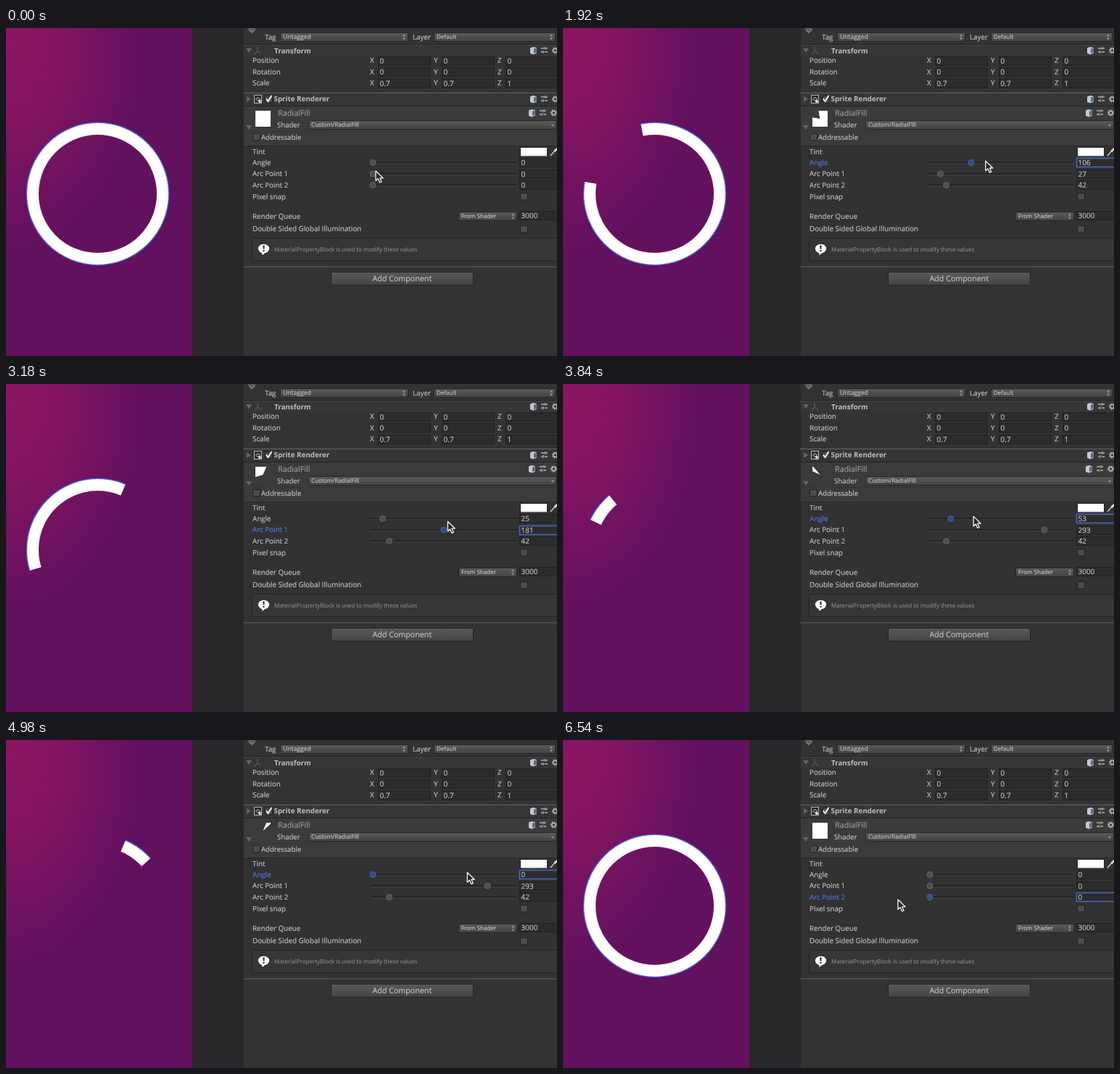
Write an HTML page that moves like this. It is 760 px wide and 452 px high and loops after 6.6 s.

```html
<!DOCTYPE html>
<html lang="en">
<head>
<meta charset="utf-8">
<title>Radial fill inspector</title>
<style>
  html, body { margin: 0; width: 100%; height: 100%; overflow: hidden; background: #282628; }
  svg { display: block; width: 760px; height: 452px; }
  text {
    font-family: "Open Sans", "Noto Sans", sans-serif; color: #bebebe;
    fill: currentColor; stroke: currentColor; stroke-width: .2px;
    text-rendering: geometricPrecision; white-space: pre;
  }
  .dim { color: #989898; }
  .note { color: #9a9a9a; stroke: none; }
  .bold { font-weight: 700; stroke: none; }
  .on { color: #5272da; }
</style>
</head>
<body>
<svg id="stage" viewBox="0 0 760 452" xmlns="http://www.w3.org/2000/svg">
  <defs>
    <radialGradient id="glow" gradientUnits="userSpaceOnUse" cx="0" cy="0" r="1" gradientTransform="translate(8 25) scale(180 285)">
      <stop offset="0" stop-color="#8d1563"/>
      <stop offset=".35" stop-color="#841462"/>
      <stop offset=".7" stop-color="#70125f"/>
      <stop offset="1" stop-color="#62115f"/>
    </radialGradient>
    <linearGradient id="raised" x2="0" y2="1">
      <stop offset="0" stop-color="#5a5a5a"/>
      <stop offset="1" stop-color="#434343"/>
    </linearGradient>
    <clipPath id="ringClip"><path/></clipPath>
    <clipPath id="thumbClip"><path/></clipPath>
  </defs>
</svg>
<script>
const NS = 'http://www.w3.org/2000/svg';
const stage = document.getElementById('stage');

function add(tag, attrs, parent = stage) {
  const el = document.createElementNS(NS, tag);
  for (const k in attrs) el.setAttribute(k, attrs[k]);
  return parent.appendChild(el);
}
const rect = (x, y, width, height, fill, more) => add('rect', { x, y, width, height, fill, ...more });
const path = (d, more) => add('path', { d, fill: 'none', ...more });
const hline = (y, stroke) => path(`M327 ${y}H760`, { stroke });

function label(x, y, str, size = 9.8, style = '') {
  const el = add('text', { x, y, 'font-size': size, class: style });
  el.textContent = str;
  return el;
}
function popup(x, y, w, str, size = 8) {
  rect(x + .5, y + .5, w - 1, 12, 'url(#raised)', { rx: 2, stroke: '#262626' });
  label(x + 4, y + 9.2, str, size);
}
const updown = (x, y) =>
  path(`M${x - 2} ${y - 1}l2-3 2 3zM${x - 2} ${y + 1}l2 3 2-3z`, { fill: '#999' });

function field(x, y, w, str) {
  const box = rect(x + .5, y + .5, w, 12, '#2c2c2c', { stroke: '#222' });
  return { box, text: label(x + 2.5, y + 9.8, str, 10) };
}
const checkbox = (x, y) =>
  rect(x + .5, y + .5, 10, 9.5, '#4c4c4c', { rx: 2, stroke: '#1e1e1e' });
const foldDown = (x, y) => path(`M${x - 4} ${y - 3}h8l-4 6z`, { fill: '#656565' });

function headerIcons(x, y) {
  path(`M${x - 4} ${y - 3.5}l4-1.5 4.5 1v8l-4.5 1.5-4-1.5z`, { fill: '#c4c8cc' });
  path(`M${x + 1} ${y - 2.5}l3-.5v6l-3 1z`, { fill: '#4c6d94' });
  path(`M${x + 11} ${y - 3}h5m2 0h2M${x + 11} ${y + 2}h2m3 0h4M${x + 17} ${y - 5}v4M${x + 14} ${y}v4`,
    { stroke: '#b2b2b2', 'stroke-width': 1.3 });
  const gear = (r, width, dash) => add('circle', { cx: x + 30.5, cy: y, r, fill: 'none',
    stroke: '#b2b2b2', 'stroke-width': width, 'stroke-dasharray': dash });
  gear(2.6, 1.6, 'none');
  gear(4, 1.2, '1.6 1.54');
}

// scene view
const CX = 126.5, CY = 228.5;
rect(0, 0, 257, 452, 'url(#glow)');
rect(257, 0, 70, 452, '#282628');
const ring = add('g', { 'clip-path': 'url(#ringClip)', fill: 'none' });
const circle = (r, stroke, width) => add('circle', { cx: CX, cy: CY, r, stroke, 'stroke-width': width }, ring);
circle(97.9, '#4573e8', 1.6);
circle(81.4, '#a8365e', .8);
circle(89.5, '#fff', 15.8);

// inspector
rect(327, 0, 433, 452, '#333');
rect(327, 23, 433, 16, '#363636');
rect(327, 90, 433, 16, '#363636');
rect(327, 107, 433, 55, '#3b3b3b');
rect(327, 162, 433, 167, '#323232');
path('M327.5 0V452', { stroke: '#2a2a2a' });
hline(22.5, '#1f1f1f');
hline(23.5, '#464646');
hline(89.5, '#646464');
hline(107.5, '#242424');
hline(142.5, '#353535');
hline(162.5, '#2a2a2a');
hline(329, '#606060');

path('M334 0h10v3l-5 5-5-5z', { fill: '#5a5a5a' });
path('M336 3l3 3 4-4', { stroke: '#999' });
label(357, 16, 'Tag');
popup(378, 6, 177, 'Untagged', 8.6);
updown(549, 12.5);
label(561, 16, 'Layer');
popup(590, 6, 168, 'Default');
updown(752, 12.5);

foldDown(335, 31);
path('M347 26v6l-4 4m4-4l5 3', { stroke: '#53566f', 'stroke-width': 1.4 });
label(370, 34.8, 'Transform', 9.8, 'bold');
headerIcons(727, 31);
[['Position', 0, 0, 0], ['Rotation', 0, 0, 0], ['Scale', 0.7, 0.7, 1]].forEach(([name, ...xyz], i) => {
  const y = 45 + i * 15.5;
  label(340, y + 3.1, name);
  xyz.forEach((v, k) => {
    const x = 502 + k * 88;
    label(x, y + 3.1, 'XYZ'[k]);
    field(x + 11, Math.floor(y) - 6, 72, v);
  });
});

path('M332 94l6 4-6 4z', { fill: '#656565' });
rect(342.5, 92.5, 10, 11, '#2b2b2b', { stroke: '#b5b5b5' });
path('M344.5 98q3-4 6 0q-3 4-6 0z', { stroke: '#ccc' });
add('circle', { cx: 350, cy: 101, r: 2, fill: '#ddd' });
checkbox(357, 93);
path('M359 97.5l2.5 3.5 5-8', { stroke: '#f0f0f0', 'stroke-width': 2 });
label(369.5, 101.3, 'Sprite Renderer', 9.8, 'bold');
headerIcons(727, 98);

rect(344, 114, 21, 22, '#fff', { 'clip-path': 'url(#thumbClip)' });
foldDown(335, 137);
label(375, 121, 'RadialFill', 10.8, 'dim');
headerIcons(725, 117);
label(374, 137, 'Shader', 9.6);
popup(417, 127, 343, 'Custom/RadialFill', 8.15);
path('M752 133h4l-2 3z', { fill: '#999' });
checkbox(340, 145);
label(352, 153.6, 'Addressable', 9.6);

label(340, 173.6, 'Tint');
rect(709.5, 164.5, 37, 12, '#fff', { stroke: '#222' });
rect(710, 175.5, 36, 1, '#ddd');
path('M751 176l7-8', { stroke: '#c8c8c8', 'stroke-width': 1.5 });
path('M756.5 170l4-4', { stroke: '#e4e4e4', 'stroke-width': 2.6 });

const rowY = i => 185.5 + i * 15.5;
const knobX = v => 506 + v * .539;
const sliders = ['Angle', 'Arc Point 1', 'Arc Point 2'].map((name, i) => {
  const y = rowY(i);
  const text = label(340, y + 3.4, name);
  path(`M503 ${y}H704`, { stroke: '#222', 'stroke-width': 2 });
  path(`M503 ${y + 1.5}H704`, { stroke: '#444' });
  const knob = add('circle', { cy: y, r: 4 });
  return { text, knob, field: field(708, Math.floor(y) - 6, 56, '0') };
});

label(340, 235.5, 'Pixel snap');
checkbox(709, 227);
label(340, 262.5, 'Render Queue');
popup(624, 253, 81, 'From Shader');
updown(699, 259.5);
field(708, 252, 56, '3000');
label(340, 279.5, 'Double Sided Global Illumination');
checkbox(709, 272);

rect(339.5, 289.5, 430, 31, '#363636', { rx: 2, stroke: '#252525' });
add('ellipse', { cx: 355.5, cy: 304, rx: 7.6, ry: 6.3, fill: '#fff' });
path('M352 308l2 5 4-4z', { fill: '#fff' });
path('M355.5 299.5v5m0 1.5v2', { stroke: '#222', 'stroke-width': 2 });
label(370, 308, 'MaterialPropertyBlock is used to modify these values', 8, 'note');

rect(448.5, 336.5, 196, 18, 'url(#raised)', { rx: 2.5, stroke: '#232323' });
label(505.5, 349, 'Add Component', 10.7);

const pointer = path('M0 0V13.5L3.2 10.6L5.6 16L8 15L5.7 9.8H10Z',
  { fill: '#262626', stroke: '#f4f4f4', 'stroke-width': 1.3, 'stroke-linejoin': 'round' });

// motion: every drag eases one slider to a value; the pointer follows
const LOOP = 6600, STEP = 60, GRIP = 2;
const ANGLE = 0, ARC1 = 1, ARC2 = 2;
const drags = [
  { slider: ARC1, from: 180, to: 600, value: 27, y: 199 },
  { slider: ARC2, from: 720, to: 1080, value: 42, y: 213 },
  { slider: ANGLE, from: 1440, to: 2340, value: 188, y: 183 },
  { slider: ANGLE, from: 2400, to: 2860, value: 25, y: 184 },
  { slider: ARC1, from: 2900, to: 3240, value: 188, y: 189 },
  { slider: ARC1, from: 3300, to: 3560, value: 293, y: 197 },
  { slider: ANGLE, from: 3700, to: 4160, value: 191, y: 177 },
  { slider: ANGLE, from: 4220, to: 4920, value: 0, y: 180 },
  { slider: ARC1, from: 5140, to: 5760, value: 83, y: 205 },
  { slider: ARC1, from: 5780, to: 6060, value: 0, y: 203 },
  { slider: ARC2, from: 6240, to: 6420, value: 0, y: 214 },
];

const ease = u => u * u * u * (10 + u * (6 * u - 15));

// eased value of one property along a list of stops
function along(stops, key, t) {
  const next = stops.findIndex(s => s.t > t);
  if (next < 0) return stops[stops.length - 1][key];
  if (next === 0) return stops[0][key];
  const a = stops[next - 1], b = stops[next];
  return a[key] + (b[key] - a[key]) * ease((t - a.t) / (b.t - a.t));
}

const valueStops = sliders.map(() => [{ t: 0, v: 0 }]);
const pointerStops = [{ t: 0, x: 512, y: 197 }];
drags.forEach((d, i) => {
  const stops = valueStops[d.slider];
  const v = stops[stops.length - 1].v;
  const held = i > 0 && drags[i - 1].slider === d.slider;
  stops.push({ t: d.from, v }, { t: d.to, v: d.value });
  pointerStops.push(
    { t: d.from, x: knobX(v) + GRIP, y: held ? drags[i - 1].y : rowY(d.slider) - 2 },
    { t: d.to, x: knobX(d.value) + GRIP, y: d.y });
});
pointerStops.push({ t: LOOP - STEP, x: 462, y: 220 });

const valuesAt = t => valueStops.map(stops => along(stops, 'v', t));

function wedge(cx, cy, r, start, sweep) {
  if (sweep > 359.5) return `M${cx - r} ${cy - r}h${2 * r}v${2 * r}h${-2 * r}z`;
  const at = deg => {
    const a = deg * Math.PI / 180;
    return `${cx + r * Math.cos(a)} ${cy + r * Math.sin(a)}`;
  };
  return `M${cx} ${cy}L${at(start)}A${r} ${r} 0 ${sweep > 180 ? 1 : 0} 1 ${at(start + sweep)}Z`;
}

const ringCut = document.querySelector('#ringClip path');
const thumbCut = document.querySelector('#thumbClip path');

function draw(time) {
  const t = Math.floor(time % LOOP / STEP) * STEP;
  const last = drags.filter(d => d.from <= t).pop();
  const values = valuesAt(t);

  sliders.forEach(({ text, knob, field }, i) => {
    const on = !!last && last.slider === i;
    text.setAttribute('class', on ? 'on' : '');
    knob.setAttribute('cx', knobX(values[i]));
    knob.setAttribute('fill', on ? '#374c86' : '#4f4f4f');
    knob.setAttribute('stroke', on ? '#4661b4' : '#666');
    field.text.textContent = Math.round(values[i]);
    field.box.setAttribute('stroke', on ? '#4863bd' : '#222');
    field.box.setAttribute('stroke-width', on ? 1.6 : 1);
  });

  // the shape and the pointer run slightly ahead of the sliders
  const [angle, p1, p2] = valuesAt(t + STEP);
  const start = p1 - angle, sweep = 360 - p1 - p2;
  ringCut.setAttribute('d', wedge(CX, CY, 110, start, sweep));
  thumbCut.setAttribute('d', wedge(354.5, 125, 30, start, sweep));

  const x = along(pointerStops, 'x', t + 1.5 * STEP), y = along(pointerStops, 'y', t);
  pointer.setAttribute('transform', `translate(${x} ${y})`);
}

const begin = performance.now();
function tick() {
  draw(performance.now() - begin);
  requestAnimationFrame(tick);
}
tick();
</script>
</body>
</html>
```
